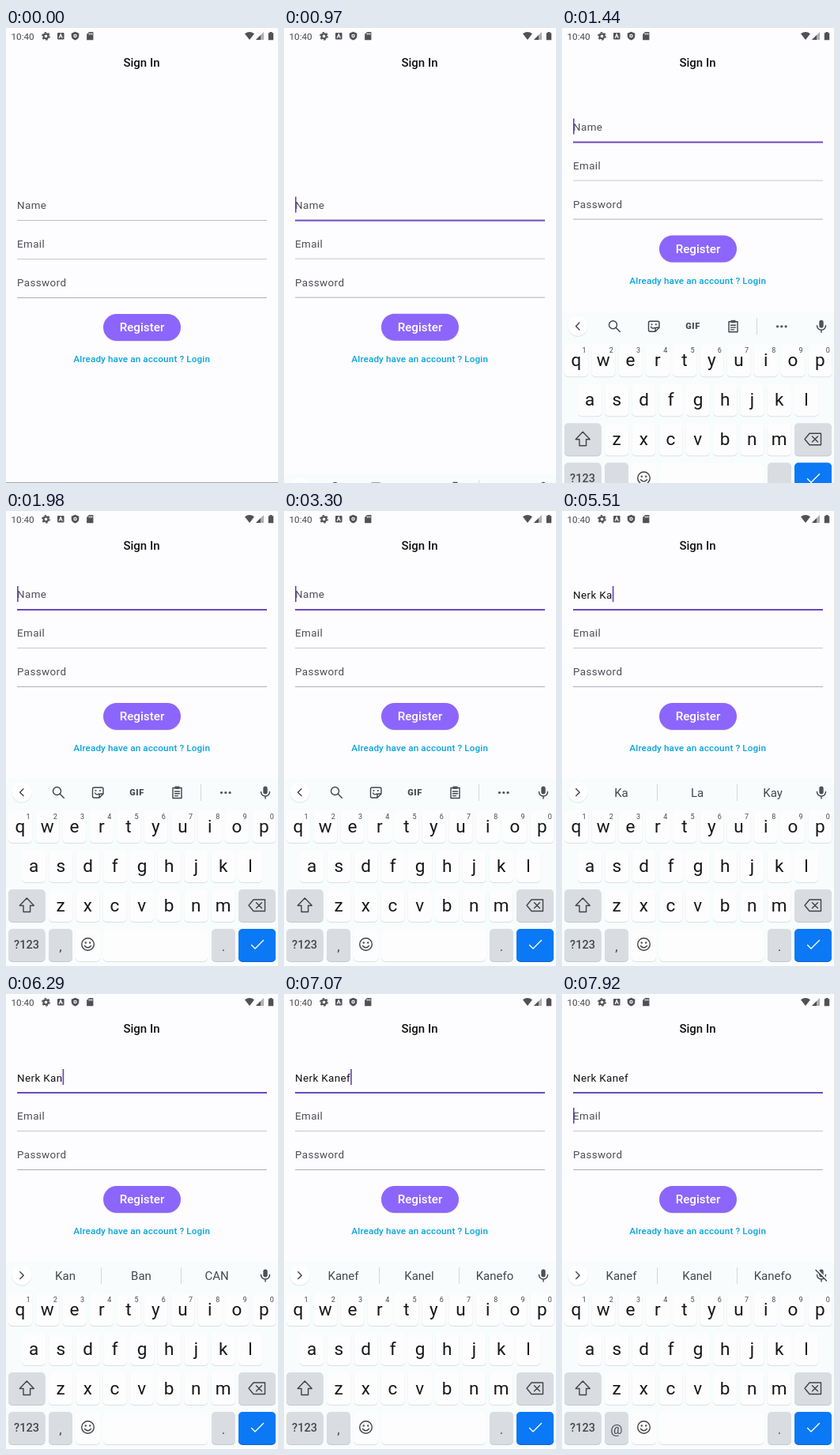
An HTML page that plays this animation: 344x576 px, repeating every 8000 ms.

```html
<!DOCTYPE html>
<html lang="en">
<head>
<meta charset="utf-8">
<title>Sign In</title>
<style>
html, body { margin: 0; width: 100%; height: 100%; overflow: hidden; background: #fdfcfe; }
svg { display: block; width: 344px; height: 576px; font-family: Roboto, sans-serif; }
text { white-space: pre; fill: #45474c; }
.mid { text-anchor: middle; }
.med { font-weight: 500; }
.field { font-size: 13.4px; letter-spacing: .4px; }
.label { fill: #4f4c57; }
.ink { fill: #111; }
.letter { font-size: 22.5px; fill: #16171a; }
.digit { font-size: 9px; }
.line { fill: none; stroke: #404348; stroke-width: 1.4; stroke-linecap: round; stroke-linejoin: round; }
.solid { fill: #505157; }
</style>
</head>
<body>
<svg viewBox="0 0 344 576">
  <rect width="344" height="576" fill="#fdfcfe"/>
  <rect y="575" width="344" height="1" fill="#a5a5a8"/>
  <g id="status"></g>
  <text class="mid med ink" x="171.5" y="49.2" font-size="15">Sign In</text>
  <g id="form">
    <text id="typed" class="field ink" x="14" y="110.5"></text>
    <text id="hint" class="field label" x="14" y="110.3">Name</text>
    <text class="field label" x="14" y="159">Email</text>
    <text class="field label" x="14" y="208">Password</text>
    <rect id="rule" x="14" y="124" width="316" height="1"/>
    <rect x="14" y="173" width="316" height="1" fill="#c9c7cd"/>
    <rect x="14" y="222" width="316" height="1" fill="#b0aeb4"/>
    <rect id="caret" width="1.6" height="20" fill="#6544b8"/>
    <rect x="123" y="244" width="98" height="33.7" rx="16.8" fill="#dcd9e4"/>
    <rect x="123" y="243" width="98" height="34" rx="17" fill="#8c66fc"/>
    <text class="mid med" x="172" y="265.3" font-size="15.2" style="fill:#fff">Register</text>
    <text class="mid med" x="171.7" y="304.1" font-size="11.75" letter-spacing=".1" style="fill:#08a5dc">Already have an account ? Login</text>
  </g>
  <g id="board">
    <rect y="339" width="344" height="240" fill="#f8fcfd"/>
    <g id="keys"></g>
    <circle cx="20" cy="357" r="12.6" fill="#e3e7ea"/>
    <circle cx="20" cy="356" r="12.4" fill="#fff"/>
    <path id="chevron" class="line"/>
    <g id="tools"></g>
    <g id="words">
      <path d="M120.5 346v21M221.5 346v21" stroke="#d3d8db"/>
      <text class="mid" x="75" y="362" font-size="15"></text>
      <text class="mid" x="171" y="362" font-size="15"></text>
      <text class="mid" x="266.5" y="362" font-size="15"></text>
      <text class="mid" x="171" y="352" font-size="13.3"></text>
      <text class="mid" x="171" y="367" font-size="10.3"></text>
    </g>
    <rect class="solid" x="325.3" y="348.5" width="5.4" height="10" rx="2.7"/>
    <path class="line" d="M322.5 355.5a5.5 5.5 0 0 0 11 0M328 361.5v2.5"/>
    <g id="mute">
      <path d="M322.5 349l13 13" stroke="#f8fcfd" stroke-width="2"/>
      <path class="line" d="M321 349.5l13.5 13.5"/>
    </g>
  </g>
</svg>
<script>
const $ = id => document.getElementById(id);
const LOOP = 8000, FOCUS = 300, RISE = 850, RISE_TIME = 910, LAG = 87, NEXT = 7920;

// time, typed text, three suggestions
const typing = [
  [3420, "N", "N", "No", "Not"],
  [3640, "Ne", "Ne", "New", "Need"],
  [3900, "Ner", "Ner", "Her", "Nerve"],
  [4120, "Nerk", "Nerk", "nerkkanef|@ozuvi.com", "Nerkka"],
  [5050, "Nerk ", "is", "and", "the"],
  [5320, "Nerk K", "K", "Keep", "Know"],
  [5510, "Nerk Ka", "Ka", "La", "Kay"],
  [5830, "Nerk Kan", "Kan", "Ban", "CAN"],
  [6600, "Nerk Kane", "Kan", "Ban", "CAN"],
  [6910, "Nerk Kanef", "Kanef", "Kanel", "Kanefo"]
];

const text = (x, y, s, cls, size = "") =>
  `<text class="mid ${cls}" x="${x}" y="${y}" ${size && `font-size="${size}"`}>${s}</text>`;
const line = (d, extra = "") => `<path class="line" d="${d}" ${extra}/>`;
const solid = (d, extra = "") => `<path class="solid" d="${d}" ${extra}/>`;
const dot = (x, y, r) => `<circle class="solid" cx="${x}" cy="${y}" r="${r}"/>`;

function key(x, y, w, fill = "#fdfdfe", shade = "#dbdfe4") {
  const box = (dy, c) => `<rect x="${x}" y="${y + dy}" width="${w}" height="41" rx="5" fill="${c}"/>`;
  return box(1, shade) + box(0, fill);
}

function drawStatus() {
  const white = 'stroke="#fdfcfe" fill="none" stroke-width="1.1"';
  $("status").innerHTML =
    '<text x="6.5" y="14.8" font-size="11.7">10:40</text>' +
    '<circle cx="50.5" cy="10.3" r="3" fill="none" stroke="#505157" stroke-width="2.2"/>' +
    '<circle cx="50.5" cy="10.3" r="4.7" fill="none" stroke="#505157" stroke-width="1.4" stroke-dasharray="2.4 2.52"/>' +
    '<rect class="solid" x="65" y="6" width="8.5" height="8.5" rx="1"/>' +
    `<path d="M67 12.7l2.2-5 2.2 5M67.8 11h2.8" ${white}/>` +
    solid("M87.5 4.8l4.8 1.9v3.4q0 3.7-4.8 5.4-4.8-1.7-4.8-5.4v-3.4z") +
    '<circle cx="87.5" cy="10" r="2.2" fill="#fdfcfe"/>' + dot(87.5, 10, 1) +
    solid("M105 5h5.4v10.2h-8.3v-7.2z") +
    `<path d="M105.2 6.5v2M107 6.5v2M108.8 6.5v2" ${white}/>` +
    solid("M302 7.3q6-4.8 12 0l-6 7.7z") +
    solid("M316 15l10-10v10z", 'opacity=".45"') + solid("M316 15l6-6v6z") +
    solid("M333.5 5h3v1.2h1.7v9h-6.4v-9h1.7z");
}

function drawKeys() {
  const step = 34.25, gray = "#d9dde1", grayShade = "#c3c8cd";
  let out = "";
  const row = (chars, x0, y, each) => [...chars].forEach((c, i) => {
    const x = x0 + i * step;
    out += key(x - 15, y, 30.2) + text(x, y + 28, c, "letter");
    if (each) out += text(x + 10, y + 11, (i + 1) % 10, "digit");
  });
  row("qwertyuiop", 18, 379, true);
  row("asdfghjkl", 35, 429);
  row("zxcvbnm", 69, 479);
  for (const [x, y, w] of [[3, 479, 46.5], [294, 479, 47], [3, 529, 46.5], [54, 529, 30], [260, 529, 30]])
    out += key(x, y, w, gray, grayShade);
  out += key(88, 529, 31) + key(123, 529, 132) + key(294, 529, 47, "#0b78f6", "#0a60c4");
  out += line("M26.3 490l-9 9.5h4.7v8h8.6v-8h4.7z");
  out += line("M313 492h14.5v14.5h-14.5l-6-7.25zM316.5 495.7l7 7M323.5 495.7l-7 7");
  out += text(26, 554.2, "?123", "med", 14.5);
  out += '<text id="comma" class="mid" x="69" y="556.5" font-size="17"></text>' + text(275, 556.5, ".", "", 17);
  out += '<circle class="line" cx="103.5" cy="548.5" r="7.8"/>' + dot(100.8, 546.5, 1.2) + dot(106.2, 546.5, 1.2) +
    line("M99.5 550.5q4 4.6 8 0");
  out += line("M310.5 549.5l4.5 4.5 10.5-10.5", 'style="stroke:#fff"');
  $("keys").innerHTML = out;
}

function drawTools() {
  $("tools").innerHTML =
    '<circle class="line" cx="64.5" cy="354.5" r="5"/>' + line("M68.3 358.3l5 5") +
    line("M111.5 350h9.5q2 0 2 2v6l-5 5h-6.5q-2 0-2-2v-9q0-2 2-2zM123 358h-3q-2 0-2 2v3M112.5 357q2 3.2 5 1") +
    dot(113.5, 354, 1.1) + dot(118.8, 354, 1.1) +
    text(165.5, 360, "GIF", "", 11).replace("<text", '<text font-weight="800" letter-spacing=".6"') +
    line("M211 350.5h11v13h-11zM213.5 355h6M213.5 357.8h6M213.5 360.6h4") + solid("M213.5 348.5h6v3.5h-6z") +
    '<path d="M246.5 346v21" stroke="#d3d8db"/>' +
    dot(272.5, 356.5, 1.6) + dot(277.8, 356.5, 1.6) + dot(283.1, 356.5, 1.6);
}

// cubic-bezier(.4, 0, .2, 1)
function ease(x) {
  if (x <= 0) return 0;
  if (x >= 1) return 1;
  let lo = 0, hi = 1;
  for (let i = 0; i < 20; i++) {
    const s = (lo + hi) / 2;
    if (1.2 * s * (1 - s) ** 2 + .6 * s * s * (1 - s) + s ** 3 < x) lo = s; else hi = s;
  }
  return lo * lo * (3 - 2 * lo);
}

const show = (el, on) => el.setAttribute("visibility", on ? "visible" : "hidden");
const shift = (id, y) => $(id).setAttribute("transform", `translate(0 ${y.toFixed(2)})`);

function render(t) {
  const rise = ms => 1 - ease((ms - RISE) / RISE_TIME);
  shift("board", 238 * rise(t));
  shift("form", 119 * rise(t - LAG));

  const [, typed = "", ...words] = typing.filter(s => s[0] <= t).pop() || [];
  const active = words.length > 0, moved = t >= NEXT, focused = t >= FOCUS;
  $("typed").textContent = typed;
  show($("hint"), !typed);
  show($("tools"), !active);
  show($("words"), active);
  $("chevron").setAttribute("d", active ? "M17.8 351.8l4.4 4.4-4.4 4.4" : "M22 351.8l-4.4 4.4 4.4 4.4");

  const [left, center = "", right] = words, pair = center.split("|");
  const shown = pair[1] ? [left, "", right, ...pair] : [left, center, right];
  $("words").querySelectorAll("text").forEach((el, i) => el.textContent = shown[i] || "");

  $("rule").setAttribute("height", focused ? 2 : 1);
  $("rule").setAttribute("fill", focused ? "#6a4bc0" : "#c0bec5");
  const width = typed && !moved ? $("typed").getComputedTextLength() : 0;
  $("caret").setAttribute("x", 14 + width);
  $("caret").setAttribute("y", moved ? 144 : 95);
  show($("caret"), focused);
  $("comma").textContent = moved ? "@" : ",";
  show($("mute"), moved);
}

drawStatus();
drawKeys();
drawTools();
const start = performance.now();
function tick() {
  render((performance.now() - start) % LOOP);
  requestAnimationFrame(tick);
}
tick();
</script>
</body>
</html>
```
